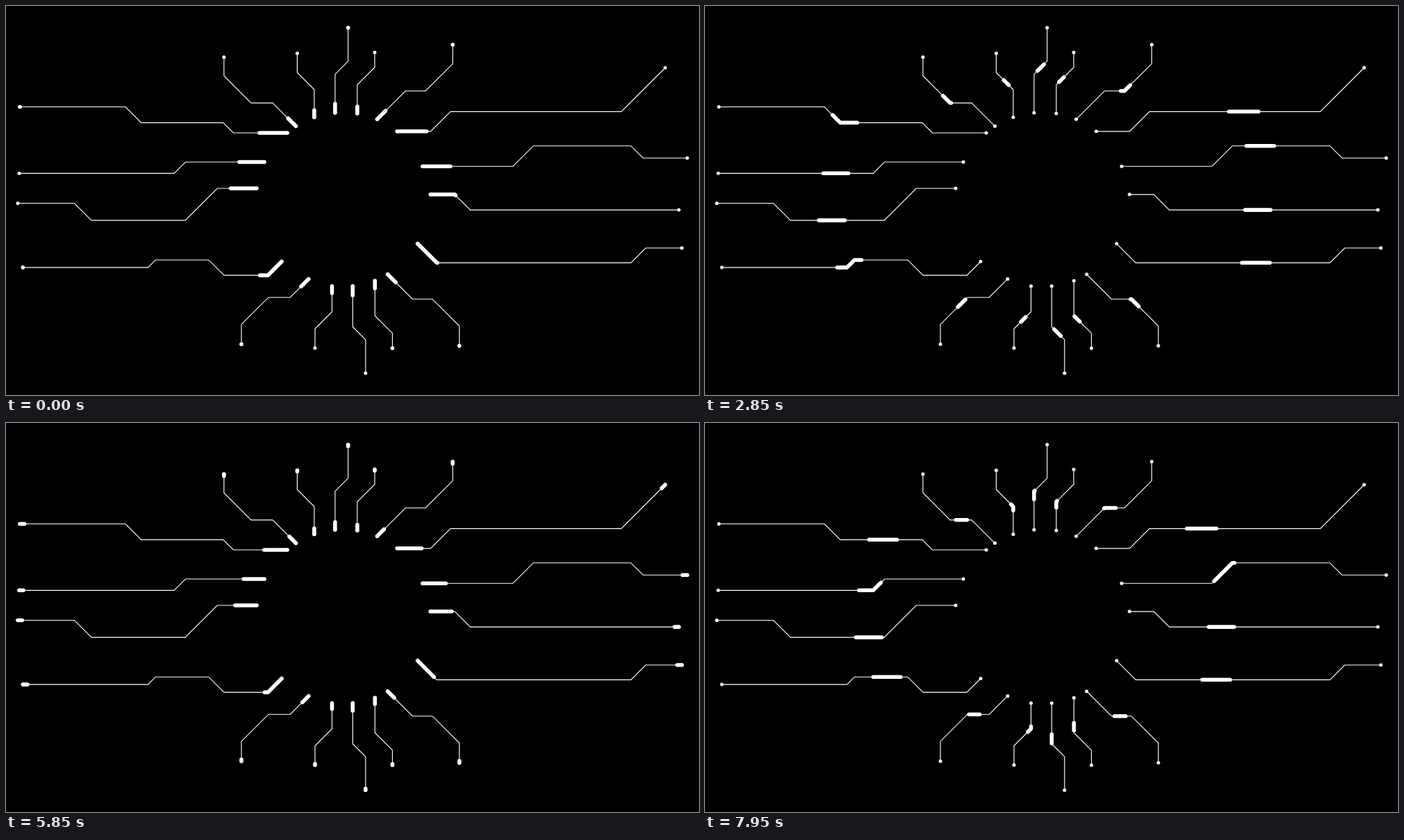
These frames come from a looping animation (998x561 px, 8000 ms). An HTML page:

```html
<!DOCTYPE html>
<html lang="en">
<head>
<meta charset="utf-8">
<title>Circuit traces</title>
<style>
  html, body { margin: 0; width: 100%; height: 100%; overflow: hidden; background: #000; }
  svg { display: block; width: 100%; height: 100%; }
  path { fill: none; stroke: #fff; }
  circle { fill: #fff; }
  .wire { stroke-width: 1.15; }
  .pulse { stroke-width: 5.6; stroke-linecap: round; stroke-linejoin: round; stroke-dasharray: 10 90; }
</style>
</head>
<body>
<svg id="stage" viewBox="0 0 998 561"></svg>
<script>
const LOOP = 8000, STEP = 150, LAP = 5950;

// Inner end of each trace, then compass moves outwards (diagonals run at 45 degrees).
const traces = [
  '405 183 w77.5 nw14.7 w118 nw22.8 w152',
  '372 225 w113.5 sw16.3 w223.2',
  '361 263 w56.8 sw46.1 w135 nw24.6 w81.5',
  '397 368.5 sw19.9 w63 nw22.2 w76.5 sw10.9 w180.2',
  '417.5 173.3 nw33.5 w31 nw39.1 n27',
  '443.9 160.5 n40 nw24.5 n27.7',
  '473.9 154 n55.6 ne18.8 n48.4',
  '505.9 155 n41.4 ne25.1 n21.4',
  '534.5 163.3 ne40.8 e28.8 ne39.2 n27.5',
  '563.3 180.8 e48.2 ne28.5 e246 ne63.3',
  '600 231.2 e130 ne29.5 e140.4 se17.5 e63.6',
  '611.3 271.8 e35 se22.3 e300.4',
  '592.8 342.8 se27.5 e279.7 ne21.3 e52',
  '549.7 387 se35.7 e28.6 se38.9 s28.5',
  '531.3 396.3 s50.4 se25.2 s21.6',
  '499.3 404 s58.7 se18.5 s48.3',
  '469.5 404 s37 sw24.5 s27.8',
  '435.8 393.7 sw26.5 w31.3 sw39 s28.6'
];

const stage = document.getElementById('stage');

function add(tag, attrs) {
  const el = document.createElementNS(stage.namespaceURI, tag);
  for (const name in attrs) el.setAttribute(name, attrs[name]);
  return stage.appendChild(el);
}

function points(trace) {
  let [x, y, ...moves] = trace.split(' ');
  x = +x;
  y = +y;
  return [[x, y], ...moves.map(move => {
    const [, dir, text] = move.match(/([a-z]+)(.+)/);
    const size = +text;
    x += size * (dir.includes('e') - dir.includes('w'));
    y += size * (dir.includes('s') - dir.includes('n'));
    return [x, y];
  })];
}

const pulses = traces.map(trace => {
  const pts = points(trace);
  const d = 'M' + pts.join('L');
  add('path', { d, class: 'wire' });
  for (const [cx, cy] of [pts[0], pts[pts.length - 1]]) add('circle', { cx, cy, r: 2.5 });
  return add('path', { d, class: 'pulse', pathLength: 100 });
});

const start = performance.now();

function draw(now) {
  const time = Math.max(0, now - start) % LOOP;
  const held = Math.floor(time / STEP) * STEP;
  const progress = held % LAP / LAP * 100;
  for (const pulse of pulses) pulse.style.strokeDashoffset = -progress;
  requestAnimationFrame(draw);
}
draw(start);
</script>
</body>
</html>
```
